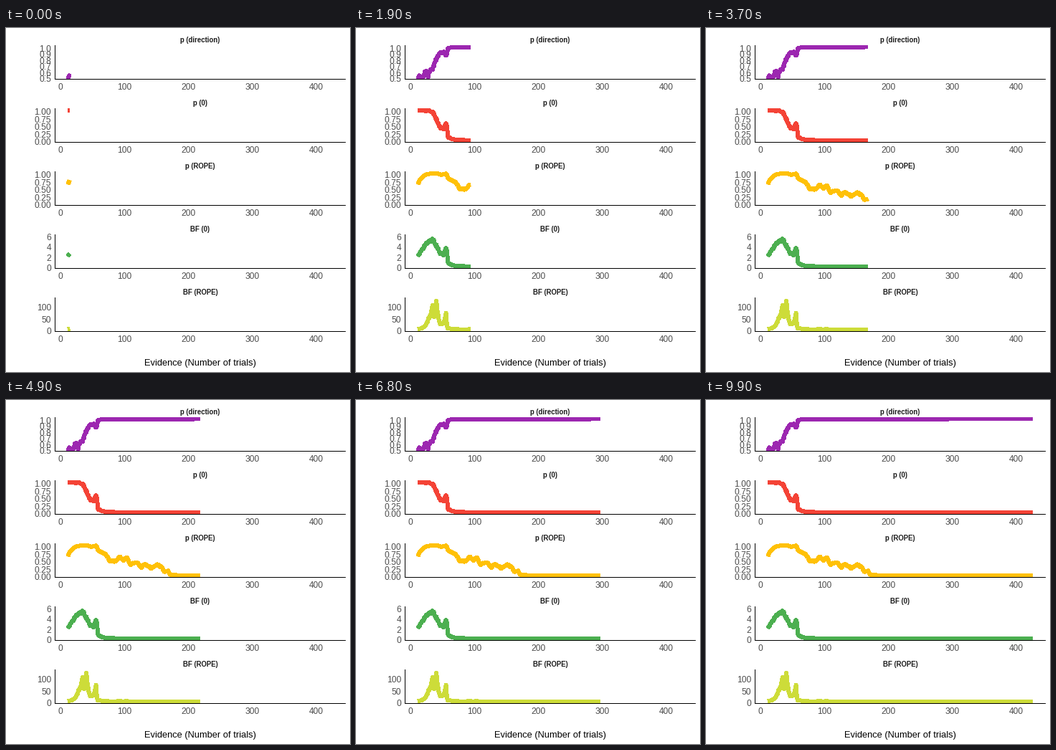
Recreate the animation shown at these times as a matplotlib script. Size 480x480 px, loop 10000 ms.

```python
from math import erf
import numpy as np
import matplotlib.pyplot as plt
from matplotlib.animation import FuncAnimation
from matplotlib.patches import Rectangle

plt.rcParams["font.family"] = "Liberation Sans"

SIZE, DPI = 480, 100
FRAMES, INTERVAL = 100, 100
PX = 72 / DPI
LEFT, RIGHT, HEIGHT, PITCH = 68, 474, 47.5, 88
ORIGIN, SCALE = 76.5, 0.8925   # pixel of trial 0, pixels per trial
BASE, SPAN = 45, 42.5          # offset of the lowest value, data height

fig = plt.figure(figsize=(SIZE / DPI, SIZE / DPI), dpi=DPI, facecolor="white")
ax = fig.add_axes([0, 0, 1, 1])
ax.set_xlim(0, SIZE)
ax.set_ylim(SIZE, 0)
ax.axis("off")


def walk(knots, jitter):
    """Join (trial, value) knots and add a little noise per trial."""
    at, value = zip(*knots)
    return np.interp(trial, at, value) + rng.normal(0, jitter, trial.size)


rng = np.random.default_rng(4)
trial = np.arange(11, 427)

# Effect size in standard errors, and log-odds of lying inside the ROPE
z = np.abs(walk([(11, 0), (20, .05), (23.5, .28), (27, .07), (31, .36),
                 (34, .33), (37.5, .7), (43, 1.1), (46, 1.3), (52, 1.38),
                 (54.5, 1.08), (56.5, 1.2), (58, 2), (64, 2.45), (77, 2.9),
                 (150, 4), (426, 6)], .04))
odds = np.exp(walk([(11, .6), (21, 2.4), (26, 3.3), (34, 4.4), (36.5, 3.7),
                    (40, 4.6), (46, 3), (51, 3.1), (55, 4), (58, 1.5),
                    (63, 1.25), (71, .7), (77, -.1), (86, -.1), (92, .5),
                    (98, 0), (103, .4), (109, -.6), (119, -.25), (126, -1),
                    (131, -.5), (142, -1.1), (151, -.55), (159, -1.1),
                    (162, -2), (168, -1.7), (171, -3.5), (195, -6),
                    (426, -9)], .06))

p_direction = np.array([.5 + .5 * erf(v / 2 ** .5) for v in z])
p_zero = np.exp(-z ** 2 / 2)
p_rope = odds / (1 + odds)
prior = 6.4 * np.tanh((trial / 28) ** 1.2)
bf_zero = prior * p_zero * (1 + rng.normal(0, .03, trial.size))
bf_rope = 1.25 * odds


def label(x, y, text, px=12, color="#4D4D4D", ha="center", weight="normal"):
    ax.text(x, y, text, fontsize=px * PX, color=color, ha=ha,
            va="baseline", weight=weight)


def rule(xs, ys):
    ax.plot(xs, ys, color="black", lw=PX, zorder=3, snap=False,
            solid_capstyle="butt")


def panel(row, title, values, low, high, ticks, fmt, color):
    top = 24 + PITCH * row

    def offset(v):
        return (v - low) / (high - low) * SPAN

    label(271, top - 4, title, 9.6, "#1A1A1A", weight="bold")
    for t in ticks:
        label(63.2, top + 51.4 - offset(t), format(t, fmt), ha="right")
    for t in range(0, 500, 100):
        label(ORIGIN - .5 + SCALE * t, top + 62.5, str(t))
    rule([LEFT + .5] * 2, [top, top + 48])
    rule([LEFT, RIGHT], [top + 47.5] * 2)

    line, = ax.plot([], [], color=color, lw=5 * PX, zorder=2,
                    antialiased=False, solid_capstyle="butt",
                    solid_joinstyle="round")
    line.set_clip_path(Rectangle((LEFT, top), RIGHT - LEFT, HEIGHT,
                                 transform=ax.transData))
    return line, top + BASE - offset(values)


quarters = np.linspace(0, 1, 5)
curves = [
    panel(0, "p (direction)", p_direction, .5, 1,
          np.linspace(.5, 1, 6), ".1f", "#9C27B0"),
    panel(1, "p (0)", p_zero, 0, 1, quarters, ".2f", "#F44336"),
    panel(2, "p (ROPE)", p_rope, 0, 1, quarters, ".2f", "#FFC107"),
    panel(3, "BF (0)", bf_zero, 0, 5.85, range(0, 7, 2), "d", "#4CAF50"),
    panel(4, "BF (ROPE)", bf_rope, 0, 129, range(0, 101, 50), "d", "#CDDC39"),
]
label(270.7, 471, "Evidence (Number of trials)", 12.9, "black")


def update(k):
    end = 13.7 + 4.155 * k
    seen = trial < end
    x = ORIGIN + SCALE * np.append(trial[seen], end)
    for line, y in curves:
        line.set_data(x, np.append(y[seen], np.interp(end, trial, y)))
    return [line for line, _ in curves]


anim = FuncAnimation(fig, update, frames=FRAMES, interval=INTERVAL,
                     repeat=True, repeat_delay=0)
plt.show()
```
